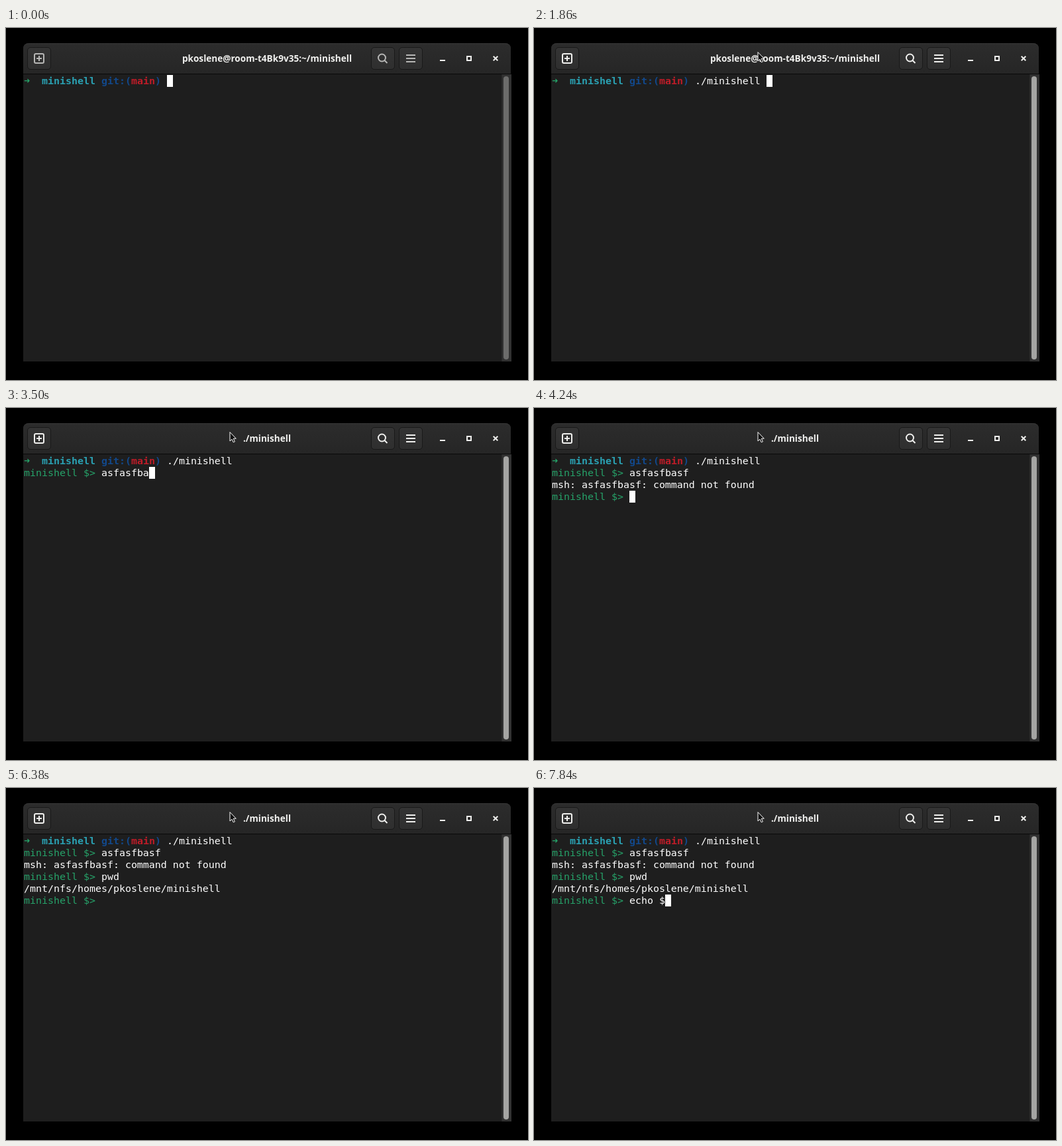
Write an HTML page that moves like this. It is 788 by 532 pixels and loops after 8 s.

```html
<!DOCTYPE html>
<html lang="en">
<head>
<meta charset="utf-8">
<title>Terminal session</title>
<style>
  html, body { margin: 0; width: 100%; height: 100%; overflow: hidden; background: #000; }
  #stage { position: relative; width: 788px; height: 532px; overflow: hidden; --focus: 0; }
  #stage > * { position: absolute; }
  .window { left: 26px; top: 23px; width: 736px; height: 481px; border-radius: 8px 8px 0 0; background: #1e1e1e; }
  .header {
    left: 26px; top: 23px; width: 736px; height: 46px; box-sizing: border-box;
    border-top: 1px solid #383838; border-radius: 8px 8px 0 0;
    background: linear-gradient(#2c2c2c, #262626); box-shadow: 0 1px #090909;
  }
  #title {
    left: 26px; top: 36px; width: 736px; text-align: center; white-space: pre;
    font: 600 13.6px/20px "Noto Sans", "Open Sans", sans-serif; color: #f0f0ee;
  }
  .button {
    top: 29px; width: 36px; height: 34px; box-sizing: border-box;
    border: 1px solid #191919; border-radius: 5px;
    background: linear-gradient(#343434, #2f2f2f);
  }
  .track { left: 748px; top: 70px; width: 15px; height: 434px; background: #313131; box-shadow: inset 1px 0 #292929; }
  .slider {
    left: 751px; top: 73px; width: 8px; height: 428px; border-radius: 4px;
    background: #a4a4a2; opacity: calc(.52 + .48 * var(--focus));
  }
  svg { left: 0; top: 0; }
  .tools { opacity: calc(.7 + .3 * var(--focus)); }
  .line {
    left: 27px; height: 18px; white-space: pre; color: #fff;
    font: 14.95px/18px "DejaVu Sans Mono", "Liberation Mono", monospace;
  }
  .green { color: #26a269; }
  .cyan { color: #2aa1b3; }
  .blue { color: #12488b; }
  .red { color: #c01c28; }
  .arrow { display: inline-block; width: 9px; }
  #caret { width: 9px; height: 18px; background: #fff; }
</style>
</head>
<body>
<div id="stage">
  <div class="window"></div>
  <div class="header"></div>
  <div id="title"></div>
  <div class="button" style="left:32px"></div>
  <div class="button" style="left:551px"></div>
  <div class="button" style="left:593px"></div>
  <div class="track"></div>
  <div class="slider"></div>
  <div id="caret"></div>
  <svg width="788" height="532" fill="none" stroke="#f0f0ee" stroke-width="2">
    <g class="tools">
      <rect x="43" y="39" width="14" height="14" rx="2"/>
      <path d="M46 46h8M50 42v8"/>
      <circle cx="567.5" cy="45" r="5.5"/>
      <path d="M571.5 49l4 4M604 41h14M604 46h14M604 51h14"/>
    </g>
    <path d="M655 49h8"/>
    <rect x="696" y="43" width="6" height="6"/>
    <path d="M735.7 42.7l6.6 6.6m0-6.6l-6.6 6.6"/>
    <path id="mouse" d="M338 36.5V50l3-2.8 2.2 4.6 2.2-1-2.1-4.6h4z" fill="#111" stroke="#fff" stroke-width="1"/>
  </svg>
</div>
<script>
const LOOP = 8000, CELL = 9, ROW = 18, LEFT = 27, TOP = 71;
const user = "pkoslene", host = "room-t4Bk9v35";
const stage = document.getElementById("stage");
const title = document.getElementById("title");
const caret = document.getElementById("caret");
const mouse = document.getElementById("mouse");

const span = (style, text, bold) => `<span class="${style}"${bold ? ' style="font-weight:700"' : ""}>${text}</span>`;
const zsh = span("green arrow", "➜", true) + "  " + span("cyan", "minishell", true) + " " +
  span("blue", "git:(", true) + span("red", "main", true) + span("blue", ")", true) + " ";
const msh = span("green", "minishell $&gt;") + " ";

// Commands have a prompt; plain output has none.
const lines = [
  { prompt: zsh, text: "./minishell " },
  { prompt: msh, text: "asfasfbasf" },
  { prompt: "", text: "msh: asfasfbasf: command not found" },
  { prompt: msh, text: "pwd" },
  { prompt: "", text: `/mnt/nfs/homes/${user}/minishell` },
  { prompt: msh, text: "echo $" }
];
lines.forEach((line, row) => {
  const el = line.el = document.createElement("div");
  el.className = "line";
  el.style.top = TOP + ROW * row + "px";
  el.innerHTML = line.prompt + "<span></span>";
  line.columns = el.textContent.length;
  line.typed = el.lastChild;
  stage.insertBefore(el, stage.querySelector("svg"));
});

// [time, active row, characters typed, caret shown]
const steps = [
  [0, 0, 0, 1], [560, 0, 0, 0],
  [1140, 0, 1, 1], [1220, 0, 2, 1], [1460, 0, 3, 1], [1620, 0, 4, 1], [1780, 0, 5, 1], [1860, 0, 12, 1],
  [2440, 1, 0, 1],
  ...Array.from({ length: 9 }, (_, i) => [3020 + 80 * i, 1, i < 4 ? i + 1 : i + 2, 1]),
  [4240, 3, 0, 1], [4820, 3, 0, 0],
  ...Array.from({ length: 4 }, (_, i) => [5230 + 80 * i, 3, i, 1]),
  [5800, 5, 0, 1], [6380, 5, 0, 0], [6540, 5, 0, 1],
  [6620, 5, 1, 1], [6780, 5, 2, 1], [6860, 5, 3, 1], [7020, 5, 4, 1], [7100, 5, 5, 1], [7840, 5, 6, 1]
];

let shown;
function show(step) {
  if (step === shown) return;
  shown = step;
  const [, active, count, visible] = step;
  lines.forEach((line, row) => {
    line.el.style.visibility = row <= active ? "visible" : "hidden";
    line.typed.textContent = row === active ? line.text.slice(0, count) : line.text;
  });
  caret.style.left = LEFT + CELL * (lines[active].columns + count) + "px";
  caret.style.top = TOP + ROW * active + "px";
  caret.style.visibility = visible ? "visible" : "hidden";
  title.textContent = active ? "./minishell" : `${user}@${host}:~/minishell`;
}

function draw() {
  const t = performance.now() % LOOP;
  show(steps.findLast(step => step[0] <= t));
  stage.style.setProperty("--focus", Math.min(5, Math.floor(t / 80)) / 5);
  mouse.style.visibility = t < 80 ? "hidden" : "visible";
  requestAnimationFrame(draw);
}
draw();
</script>
</body>
</html>
```
